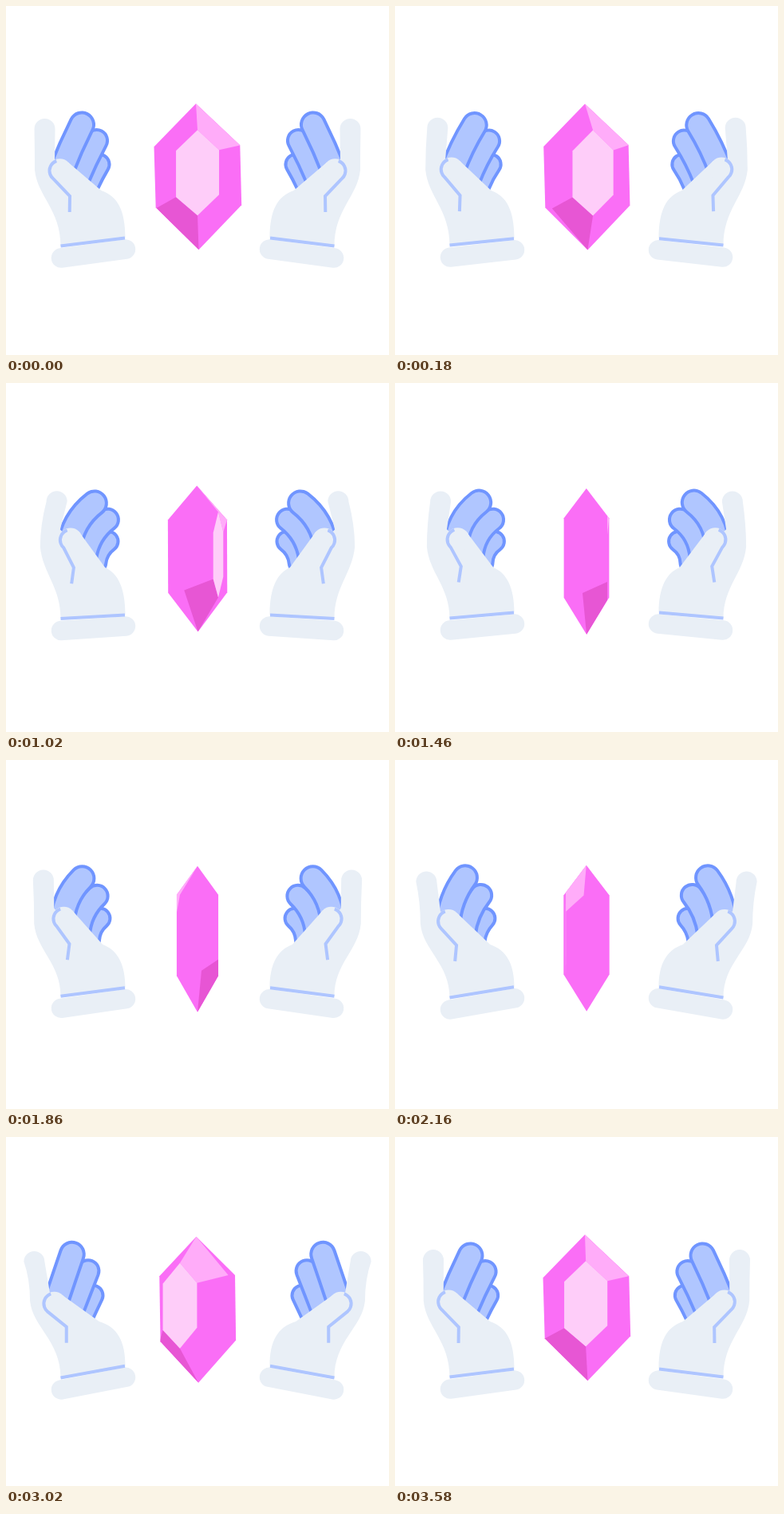
Recreate the animation shown at these times as an HTML page with a canvas. Size 480x437 px, loop 3.6 s.

```html
<!DOCTYPE html>
<html lang="en">
<head>
<meta charset="utf-8">
<title>Gem between hands</title>
<style>
html, body { margin: 0; width: 100%; height: 100%; overflow: hidden; background: #fff; }
canvas { display: block; }
</style>
</head>
<body>
<canvas id="stage" width="480" height="437"></canvas>
<script>
const ctx = document.getElementById('stage').getContext('2d');
const LOOP = 3600;
const GLOVE = '#e9eff6', LINE = '#aec5ff', FINGER = '#b0c6ff', FINGER_EDGE = '#7095ff';
const PINK = '#fa6ef6', PALE = '#fecdf9', LIGHT = '#ffacf9', DARK = '#e756d4';

const clamp = v => Math.max(0, Math.min(1, v));

function stroke(color, width, cap = 'butt') {
  ctx.strokeStyle = color;
  ctx.lineWidth = width;
  ctx.lineCap = cap;
  ctx.stroke();
}

function polygon(points, color) {
  ctx.beginPath();
  points.forEach(p => ctx.lineTo(...p));
  ctx.closePath();
  ctx.fillStyle = color;
  ctx.fill();
}

// A rounded stroke from fingertip to base, bulging sideways by the bend
function finger(x, y, baseX, baseY, bend, width) {
  const dx = baseX - x, dy = baseY - y, len = Math.hypot(dx, dy);
  ctx.beginPath();
  ctx.moveTo(x, y);
  ctx.quadraticCurveTo((x + baseX) / 2 - dy / len * bend, (y + baseY) / 2 + dx / len * bend, baseX, baseY);
  stroke(FINGER_EDGE, width, 'round');
  stroke(FINGER, width - 8, 'round');
}

// Every joint sways on the same slow wave
function hand(phase) {
  const c = Math.cos(phase), s = Math.sin(phase);
  const sway = (mean, byCos, bySin) => mean + byCos * c + bySin * s;
  const tipX = sway(48.5, 0, 15.5), tipY = sway(152, 2, -3.5);
  const thumbX = sway(70.5, -3, 10), thumbY = sway(202.3, 4, -5);
  const foldX = sway(80, 0, 5), foldY = sway(234, 4, -2);
  const left = sway(298, 2.5, -2.5), right = sway(288, 2.5, 3);
  const side = sway(36, 0, 7), bend = sway(7.5, -6, 5);
  const base = thumbX + 2 - bend * 0.3;

  finger(sway(118, -1, 10), 198.3, base + 34, 225, bend * 0.5, 29);
  finger(sway(114.5, -1, 13), sway(169.5, -1, 1.5), base + 21, 218, bend * 0.8, 31);
  finger(sway(96, -1, 15), sway(148.5, 0, 2), base, 207, bend, 34);

  ctx.fillStyle = GLOVE;
  ctx.beginPath();
  ctx.arc(tipX, tipY, 13, Math.PI, 0);
  ctx.lineTo(side + 25, thumbY - 13);
  ctx.lineTo(thumbX, thumbY);
  ctx.lineTo(thumbX + 10.5, thumbY - 10.5);
  ctx.lineTo(95 + thumbX * 0.36, 231);
  ctx.bezierCurveTo(140, 238, 149.5, 256, 149.5, right);
  ctx.lineTo(68.5, left);
  ctx.bezierCurveTo(68.5, 255, side + 3, 238, side, 205);
  ctx.quadraticCurveTo(side, 178, tipX - 13, tipY);
  ctx.fill();

  ctx.beginPath();
  ctx.arc(thumbX, thumbY, 15, 0, 7);
  ctx.fill();
  ctx.beginPath();
  ctx.arc(thumbX, thumbY, 13, -1.9, 2.3, true);
  ctx.lineTo(foldX, foldY);
  ctx.lineTo(foldX - bend * 0.2, foldY + 20);
  stroke(LINE, 4);

  ctx.beginPath();
  ctx.moveTo(69, left + 15);
  ctx.lineTo(150, right + 14);
  stroke(GLOVE, 24.5, 'round');
  ctx.beginPath();
  ctx.moveTo(68.5, left);
  ctx.lineTo(149, right);
  stroke(LINE, 4);
}

function gem(t, phase) {
  const c = Math.cos(phase), s = Math.sin(phase), skew = ((1 + c) / 2) ** 2;
  const topY = 127.5 - 5.3 * c, half = 40 + 14 * c;
  const shoulder = topY + 44.5 + 8.5 * c, hip = topY + 133 - 4.5 * c;
  const top = [239 - c, topY], bottom = [240.75 + 0.75 * c, topY + 183];
  ctx.save();
  polygon([
    top,
    [240 + half - 0.7 * skew, shoulder - skew],
    [240 + half + 1.2 * skew, hip - 1.5 * skew],
    bottom,
    [240 - half + 1.7 * skew, hip + 1.5 * skew],
    [240 - half - 0.5 * skew, shoulder + skew]
  ], PINK);
  ctx.clip();

  // The front face narrows as it slides to an edge, and the next one follows
  const faceHalf = Math.max(0, 11.5 + 15.5 * c - 2 * s);
  for (const turn of [t, t - LOOP]) {
    const angle = turn / LOOP * 2 * Math.PI;
    const middle = 240 + 26 * Math.sin(Math.max(-Math.PI / 2, Math.min(Math.PI / 2, angle)));
    const l = middle - faceHalf, r = middle + faceHalf;
    const face = [
      [middle, topY + 33], [r, topY + 58], [r, topY + 114],
      [middle, topY + 140], [l, topY + 117], [l, topY + 59]
    ];
    const darkX = turn < 0 ? 240 - half : 188 + 57 * (turn / 1860) ** 0.8;
    ctx.globalAlpha = clamp(Math.min(turn + 1120, 2160 - turn) / 300);
    polygon([[darkX, topY + 131], face[4], face[3], bottom], DARK);
    ctx.globalAlpha = 1;
    if (Math.abs(turn) > LOOP / 2) continue;
    const lightX = turn > 0 ? 240 + half : 293 - 79 * (-turn / LOOP * 2) ** 1.5;
    polygon([top, [lightX, shoulder - skew], face[1], face[0]], LIGHT);
    polygon(face, PALE);
  }
  ctx.restore();
}

function draw() {
  const t = performance.now() % LOOP, phase = t / LOOP * 2 * Math.PI;
  ctx.clearRect(0, 0, 480, 437);
  hand(phase);
  ctx.save();
  ctx.translate(480, 0);
  ctx.scale(-1, 1);
  hand(phase);
  ctx.restore();
  gem(t, phase);
  requestAnimationFrame(draw);
}
draw();
</script>
</body>
</html>
```
